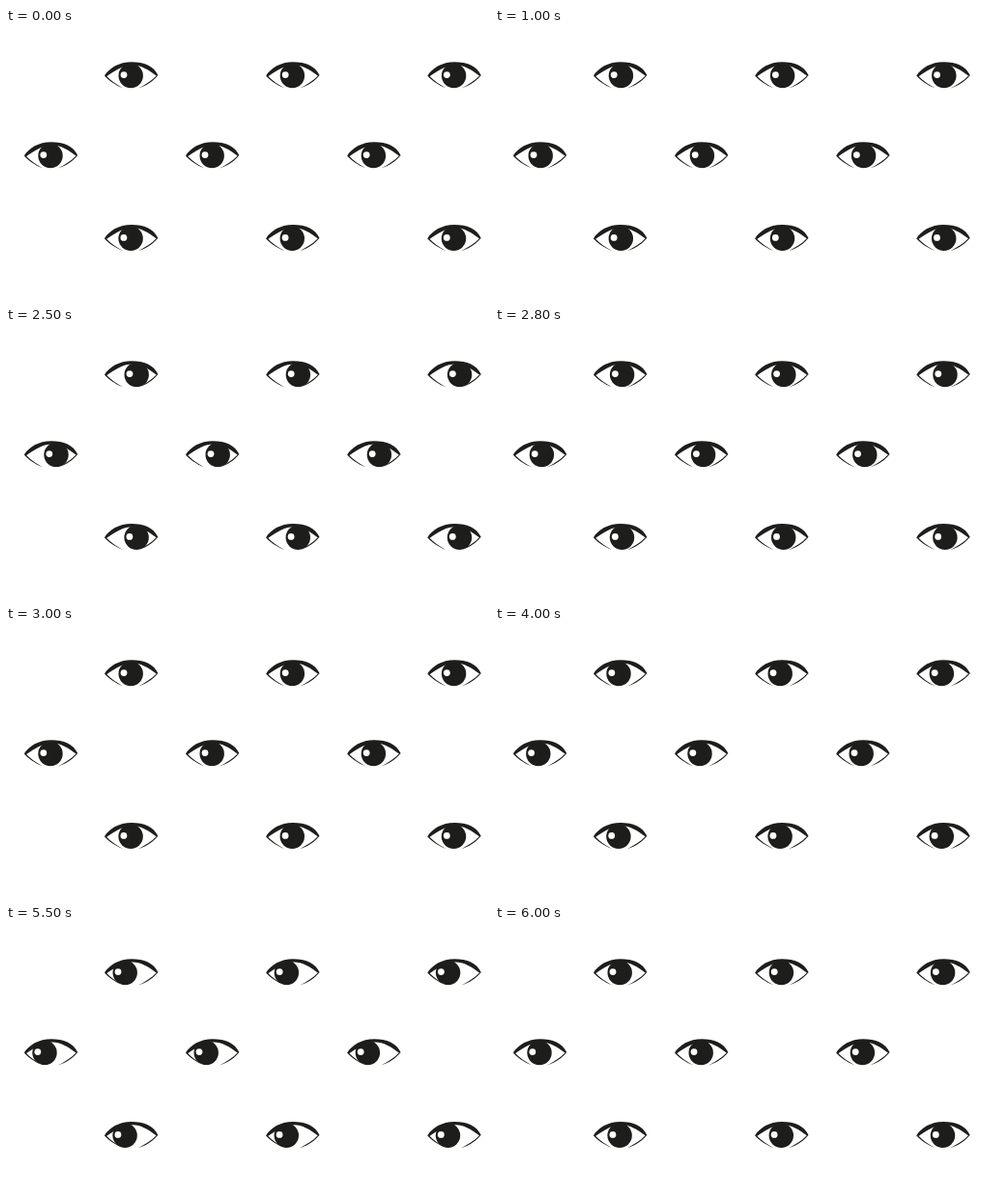
Recreate the animation shown at these times as an HTML page. Size 500 px wide and 281 px high, loop 7000 ms.

```html
<!DOCTYPE html>
<html lang="en">
<head>
<meta charset="utf-8">
<title>Looking eyes</title>
<style>
html, body { margin: 0; width: 100%; height: 100%; overflow: hidden; background: #fff; }
svg { display: block; width: 100vw; height: 100vh; }
</style>
</head>
<body>
<svg viewBox="0 0 500 281" preserveAspectRatio="none">
  <defs>
    <clipPath id="opening">
      <path d="M101.9 49.6C107 41.5 117 35.3 130 35.3C143 35.3 153 39.6 157.4 49C153 54.8 146 59.4 137 62.3Q129.3 63.2 121 62.2C113 59 106 54.2 101.9 49.6Z"/>
    </clipPath>
    <g id="eye" fill="#1d1d1b">
      <path d="M101.9 49.6C107 41.5 117 35.3 130 35.3C143 35.3 153 39.6 157.4 49L156 49.8C147.5 43 139.5 38.4 131 38.4C122 38.4 114 43 104 50.2Z"/>
      <path d="M101.9 49.4C106 54.2 113 59 121 62.2C114 58.4 108 54.2 104 49.8Z"/>
      <path d="M157.4 49C153 54.8 146 59.4 137 62.5C144 58.6 151 54.5 155.6 49.4Z"/>
      <g clip-path="url(#opening)">
        <g id="iris">
          <circle cx="129.2" cy="49.5" r="12.7"/>
          <circle cx="122" cy="48.6" r="3.4" fill="#fff"/>
        </g>
      </g>
    </g>
  </defs>
  <g id="eyes"></g>
</svg>
<script>
const LOOP = 7000, STEP = 100, STEPS = 6, SHIFT = 1.2;
const GAP = 167.2;
const rows = [[0, 0], [-83.2, 83], [-0.1, 168.8]];
const iris = document.getElementById('iris');

document.getElementById('eyes').innerHTML = rows.map(([x, y]) =>
  [0, 1, 2].map(i => `<use href="#eye" x="${x + i * GAP}" y="${y}"/>`).join('')
).join('');

// Steps completed since a move began; the first lands at once.
const steps = (t, start) =>
  Math.max(0, Math.min(STEPS, Math.floor((t - start) / STEP) + 1));

function draw(now) {
  const t = now % LOOP;
  const right = steps(t, 1000) - steps(t, 2500);
  const left = steps(t, 4000) - steps(t, 5500);
  iris.setAttribute('transform', `translate(${(right - left) * SHIFT} 0)`);
}

const begin = performance.now();
function tick() {
  draw(performance.now() - begin);
  requestAnimationFrame(tick);
}
tick();
</script>
</body>
</html>
```
